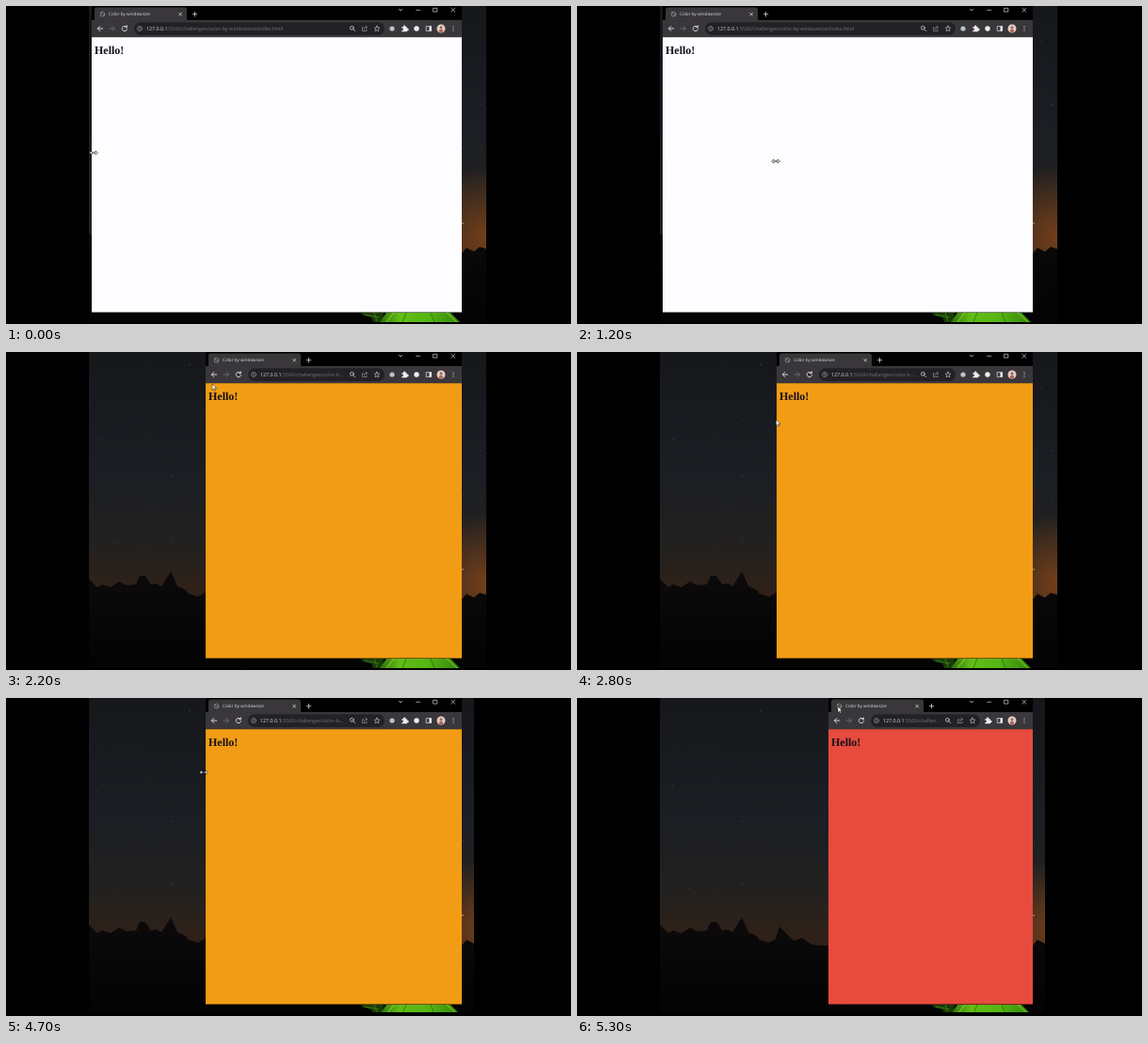
These frames come from a looping animation (600x338 px, 5400 ms). An HTML page:

```html
<!DOCTYPE html>
<html lang="en">
<head>
<meta charset="utf-8">
<title>Color by windowsize</title>
<style>
  html, body { margin: 0; width: 100%; height: 100%; overflow: hidden; background: #000; }
  svg { display: block; width: 100%; height: 100%; }
  text { font-family: "Open Sans", "Noto Sans", sans-serif; text-rendering: geometricPrecision; }
  .icon { fill: none; stroke: #d6d4d8; stroke-width: .8; stroke-linecap: round; stroke-linejoin: round; }
  .dim { stroke: #77757a; }
  .hello { font: bold 12px "Liberation Serif", "Noto Serif", serif; fill: #16101a; }
</style>
</head>
<body>
<svg viewBox="0 0 600 338" xmlns="http://www.w3.org/2000/svg">
  <defs>
    <linearGradient id="sky" x2="0" y2="1">
      <stop offset="0" stop-color="#15171b"/>
      <stop offset=".4" stop-color="#1b1e23"/>
      <stop offset=".62" stop-color="#23211f"/>
      <stop offset=".75" stop-color="#2f2119"/>
    </linearGradient>
    <radialGradient id="glow" gradientUnits="userSpaceOnUse" cx="512" cy="246" r="75">
      <stop offset="0" stop-color="#74401b"/>
      <stop offset="1" stop-color="#74401b" stop-opacity="0"/>
    </radialGradient>
    <linearGradient id="ground" x2="0" y2="1">
      <stop offset="0" stop-color="#0c0a0b"/>
      <stop offset="1" stop-color="#030304"/>
    </linearGradient>
    <linearGradient id="tent">
      <stop offset="0" stop-color="#2f6f0c"/>
      <stop offset=".25" stop-color="#62bd16"/>
      <stop offset=".6" stop-color="#55b512"/>
      <stop offset="1" stop-color="#35850c"/>
    </linearGradient>
    <clipPath id="screen"><rect id="crop" x="88" width="422" height="336"/></clipPath>
  </defs>
  <rect width="600" height="338"/>

  <g clip-path="url(#screen)">
    <rect x="88" width="422" height="336" fill="url(#sky)"/>
    <rect x="430" y="170" width="80" height="100" fill="url(#glow)"/>
    <g id="stars" fill="#8c93a0"></g>
    <path fill="url(#ground)" d="M88 241l9 9 5-3 9 3 9-6 8 4 10-1 4-9 6 0 6 9 6-1 5 3 4-6 6-10 4 9 3 7 9 4 3 4 10 3 7-4 4-13 10 10 5 5 9-3 10 7 9 1H484l5-6 8 4 6-5 7 2V336H88z"/>
    <path fill="#183b09" d="M377 326h24l-1 10h-10l-2-5-9-2z"/>
    <path d="M381 328l15 3M391 326l3 9" stroke="#438a16" stroke-width=".8"/>
    <path fill="url(#tent)" d="M404 326h68l10 10h-85z"/>
    <path d="M412 326l-8 10M468 326l11 10" stroke="#a0e43c" stroke-width=".8"/>
    <path d="M425 326l-4 10M451 326l4 10" stroke="#296608" stroke-width=".7"/>
    <circle cx="485" cy="231" r=".8" fill="#c9a98a"/>
  </g>

  <rect id="frame" width="1" height="326"/>
  <rect id="toolbar" y="15" height="18.3" fill="#39373a"/>
  <rect id="page" y="33.2" height="292.3"/>
  <rect id="pill" y="17.3" height="13.6" rx="6.8" fill="#222125"/>

  <g id="left">
    <path fill="#39373a" d="M1 15.5q2 0 2-2V4q0-2.5 2.5-2.5h93q2.5 0 2.5 2.5v9.500q0 2 2 2z"/>
    <g class="icon">
      <circle cx="11.500" cy="8.700" r="2.400" stroke="#929095"/>
      <path stroke="#929095" d="M9.800 7l3.400 3.400"/>
      <path d="M92.800 7.300l2.800 2.800m0-2.800l-2.800 2.800M107.200 8.700h4.600m-2.300-2.300v4.600"/>
      <path d="M11.700 24H6.300m2.500-2.500L6.300 24l2.500 2.500" stroke-width="1"/>
      <path class="dim" d="M19 24h5.400m-2.500-2.500L24.400 24l-2.500 2.500"/>
      <path d="M37.100 22.300a2.700 2.700 0 1 0 .5 2.300M37.400 20.900v1.800h-1.800" stroke-width="1"/>
      <circle cx="51" cy="24" r="2.500" stroke="#a5a3a8" stroke-width=".6"/>
      <path d="M51 23.700v1.400M51 22.500v.1" stroke="#a5a3a8"/>
    </g>
    <text x="18" y="10.400" font-size="4.620" fill="#dddce0">Color by windowsize</text>
    <text x="58" y="25.900" font-size="5.350" fill="#dddce0">127.0.0.1<tspan id="path" fill="#77757a"></tspan></text>
    <text class="hello" x="3" y="51.400">Hello!</text>
  </g>

  <g class="icon">
    <path d="M417.300 3.300l1.700 1.700 1.700-1.700M435.700 4.300h4M454 2.300h3.800v3.800H454zM472.900 2.300l4 4m0-4l-4 4" stroke-width=".7"/>
  </g>
  <g id="tools" class="icon">
    <circle cx="367.400" cy="23.300" r="1.900"/><path d="M368.900 24.800l1.800 1.800"/>
    <path stroke="#a5a3a8" stroke-width=".6" d="M379.700 22.700h-1.200v3.800h4.600v-1.400M380.300 24.800q.2-2.400 3-2.400m-1.200-1.200l1.300 1.200-1.300 1.200"/>
    <path stroke-width=".6" d="M394 21.100l.9 1.900 2 .2-1.500 1.400.4 2.100-1.800-1-1.800 1 .4-2.100-1.500-1.400 2-.2z"/>
  </g>
  <circle id="extA" cx="410" cy="24" r="2.600" fill="#b9c4cc"/>
  <path id="puzzle" fill="#f0eff2" d="M420.300 22.300h1.700a1.200 1.200 0 1 1 2.200 0h1.700v1.600a1.200 1.200 0 1 1 0 2.200v1.200h-5.600v-1.600a1.100 1.100 0 1 0 0-2z"/>
  <circle id="extB" cx="436" cy="24" r="2.700" fill="#f0eff2"/>
  <path d="M446.600 21.600h5v4.800h-5z" class="icon"/>
  <path d="M449.500 21.500h2.200v5h-2.200z" fill="#f0eff2"/>
  <circle cx="462" cy="24" r="4.500" fill="#e2cfc6"/>
  <path d="M459.700 27.500q0-3 2.300-3t2.300 3q-2.300 1-4.600 0z" fill="#b5655a"/>
  <circle cx="462" cy="22.800" r="1.500" fill="#9c6a58"/>
  <g fill="#d6d4d8"><circle cx="475" cy="21.900" r=".6"/><circle cx="475" cy="24" r=".6"/><circle cx="475" cy="26.100" r=".6"/></g>

  <path id="arrow" d="M0 0v6.300l1.500-1.300 1 2.300 1.100-.5-1-2.200h2z" fill="#fff" stroke="#111" stroke-width=".5"/>
  <path id="resize" d="M-4.500 0l2.400-2v1.300h1.500v1.400h-1.500V2zM4.500 0l-2.400-2v1.300H.6v1.400h1.500V2z" fill="#fff" stroke="#111" stroke-width=".6"/>
</svg>
<script>
const $ = id => document.getElementById(id);
const set = (id, attrs) => { for (const k in attrs) $(id).setAttribute(k, attrs[k]); };
const show = (id, on) => set(id, { visibility: on ? "visible" : "hidden" });

const LOOP = 5400, STEP = 100, RIGHT = 484;

const layouts = [
  { from: 0, left: 91, color: "#fdfcfe", path: ":5500/challenges/color-by-windowsize/index.html" },
  { from: 1300, left: 212, color: "#f19c14", path: ":5500/challenges/color-b..." },
  { from: 5100, left: 267, color: "#e64b3e", path: ":5500/challen...", narrow: true }
];

// time, x, y, pointer kind
const pointerKeys = [
  [0, 93, 156, "resize"], [700, 93, 156, "resize"], [1200, 211, 165, "resize"],
  [1300, 212, 164, "arrow"], [1600, 212, 164, "arrow"], [2200, 219, 34, "arrow"],
  [2500, 219, 34, "arrow"], [2900, 210, 79, "resize"], [4800, 210, 79, "resize"],
  [5100, 258, 79, "resize"], [5300, 277, 9, "arrow"]
];

function drawStars() {
  let seed = 17;
  const random = () => (seed = seed * 16807 % 2147483647) / 2147483647;
  let dots = "";
  for (let i = 0; i < 110; i++) {
    const x = 88 + random() * 422, y = random() * 220;
    dots += `<circle cx="${x}" cy="${y}" r="${.25 + random() * .3}" opacity="${.2 + random() * .5}"/>`;
  }
  $("stars").innerHTML = dots;
}

function pointerAt(t) {
  const i = pointerKeys.findLastIndex(k => k[0] <= t);
  const a = pointerKeys[i], b = pointerKeys[i + 1] || a;
  const u = b === a ? 0 : (t - a[0]) / (b[0] - a[0]);
  const e = u * u * (3 - 2 * u);
  // the pointer rests until its last hop onto the tab
  const move = a[0] === 5100 ? 0 : e;
  return { x: a[1] + (b[1] - a[1]) * move, y: a[2] + (b[2] - a[2]) * move, kind: a[3] };
}

function render(t) {
  const { left, color, path, narrow } = layouts.findLast(l => l.from <= t);
  const width = RIGHT - left, shift = narrow ? 26 : 0;
  for (const id of ["frame", "toolbar", "page"]) set(id, { x: left, width });
  set("page", { fill: color });
  set("pill", { x: left + 45, width: 402 + shift - left - 45 });
  set("left", { transform: `translate(${left})` });
  set("tools", { transform: `translate(${shift})` });
  set("puzzle", { transform: `translate(${shift / 2})` });
  show("extA", !narrow);
  show("extB", !narrow);
  if ($("path").textContent !== path) $("path").textContent = path;

  const cropped = t >= 3700;
  set("crop", { width: cropped ? 409 : 422, height: cropped ? 334 : 336 });

  const pointer = pointerAt(t);
  for (const kind of ["arrow", "resize"]) show(kind, kind === pointer.kind);
  set(pointer.kind, { transform: `translate(${pointer.x} ${pointer.y})` });
}

drawStars();
const start = performance.now();
function tick() {
  const t = (performance.now() - start) % LOOP;
  render(Math.floor(t / STEP) * STEP);
  requestAnimationFrame(tick);
}
tick();
</script>
</body>
</html>
```
